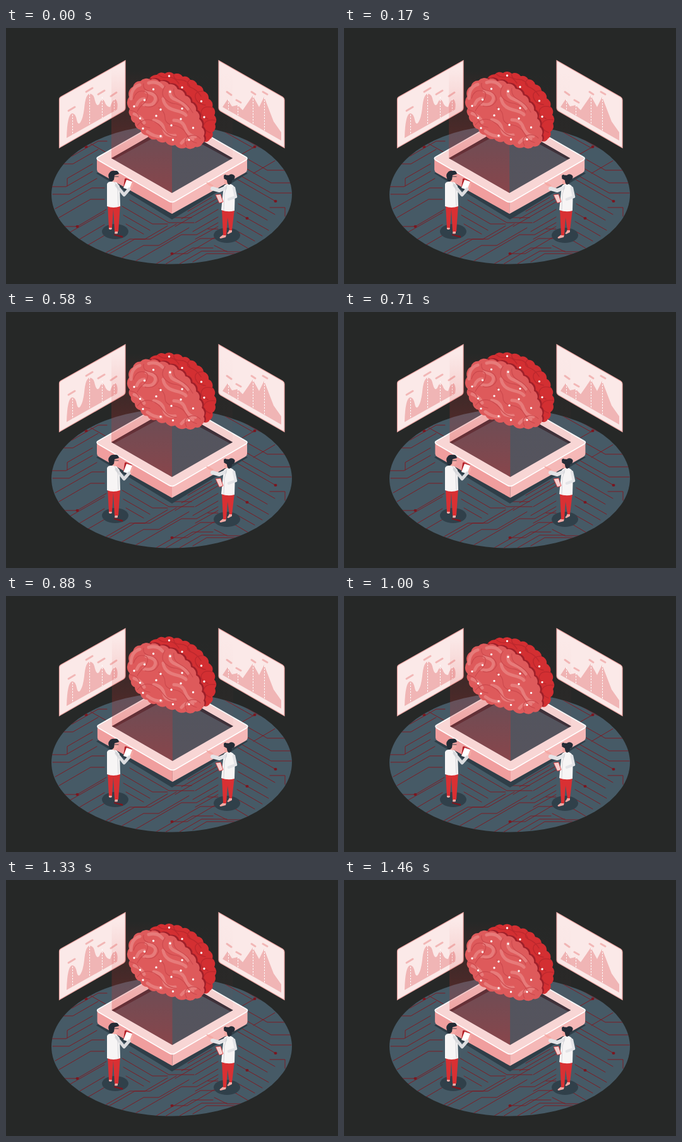
An HTML page that plays this animation: 526x405 px, repeating every 1500 ms.

```html
<!DOCTYPE html>
<html lang="en">
<head>
<meta charset="utf-8">
<title>Brain lab</title>
<style>
  html, body { margin: 0; width: 100%; height: 100%; overflow: hidden; background: #262827; }
  svg { display: block; width: 526px; height: 405px; }
  .line { fill: none; stroke-linecap: round; stroke-linejoin: round; }
  .dash { fill: none; stroke: #fff; stroke-width: 1; stroke-dasharray: 2.5 2; }
</style>
</head>
<body>
<svg viewBox="0 0 526 405">
  <defs>
    <linearGradient id="redBeam" x2="0" y2="1">
      <stop offset=".05" stop-color="#d63030" stop-opacity="0"/>
      <stop offset="1" stop-color="#d63030" stop-opacity=".42"/>
    </linearGradient>
    <linearGradient id="dimBeam" x2="0" y2="1">
      <stop offset=".05" stop-color="#b04040" stop-opacity="0"/>
      <stop offset="1" stop-color="#b04040" stop-opacity=".06"/>
    </linearGradient>
    <clipPath id="floorClip"><ellipse cx="262.5" cy="263.5" rx="190.5" ry="110"/></clipPath>
    <clipPath id="rearClip"><path class="rear"/></clipPath>
    <clipPath id="frontClip"><path class="front"/></clipPath>
  </defs>

  <!-- circuit floor -->
  <g clip-path="url(#floorClip)">
    <path fill="#465a66" d="M70 150h390v230H70z"/>
    <g class="line" stroke="#7d1c24" stroke-width="1">
      <path d="M73 251h22l42-24M74 263h26l44-25M78 286l58-33h20M84 300l50-29h22M97 250v-12l40-23M88 215h18l40-23M104 203l42-24h14M127 188h-24M125 178l34 19M113 314H92M113 314l46-27M98 325l58-33M110 338l46-27"/>
      <path d="M122 348l36-21M132 358h22l42-24h24l36-21M152 364l52-30h24l42-24M176 368l42-24h24l48-28M200 372l78-45h24l34-19M184 282l48 28h24M186 296l42 24M190 310l28 16M196 272l62 36h40M212 270l52 30h30M226 380l82-47h26M263 357h24l46-27"/>
      <path d="M394 188l-30 17M372 172l30 17h34M384 208l30 17h32M380 222l40 23h30M372 234l48 27h32M427 274l-68-39M418 284h24v14M368 262l58 33M368 278l46 26M382 301l-16-9M382 301l34 19M366 306l40 23M346 164l46 26M392 230l34-20"/>
      <path d="M288 290l38-22M278 302l56-32M268 314l68-39M300 308l36-21M296 322l40-23M300 334l36-20M252 374l44-26h32M270 376l40-23h40M296 370l22-13h44M364 320l30 17M362 336l22 13M320 318h16M330 344l20 10h40"/>
    </g>
    <path class="line" stroke="#7b1720" stroke-width="4" d="M126.500 188h1M112.500 314h1M262.500 357h1M393.500 188h1M426.500 274h1M381.500 301h1"/>
  </g>

  <!-- left screen -->
  <path fill="#fbe9e8" stroke="#f0a9a7" stroke-width="1.200" d="M84.500 113q0-3 3-4.500L189 51.500v75q0 3-3 5L84.500 189.500z"/>
  <path fill="#f0b5b5" d="M96 174q1-38 9-39 5 0 7 10 2 10 6 4 4-6 6-22 2-23 9-23 6 0 8 11 3 11 7 5 4-11 8-4 3 9 9 9 4-13 9-12 4 5 2 16z"/>
  <path class="dash" d="M105.500 137v32M132.500 104v49M152.500 109v33M171.500 112v19"/>
  <path class="line" stroke="#f2b7b6" stroke-width="3" d="M99 131l10-6M127 101l10-6M146 105l10-6M166 108l9-6"/>

  <!-- right screen -->
  <path fill="#fbe9e8" stroke="#f0a9a7" stroke-width="1.200" d="M337 51.500l101 57.500q3 2 3 5v75.500l-101-58q-3-2-3-5z"/>
  <path fill="#f0b5b5" d="M343 125l8-12 7 11 9-2 8 8 16-23 10 18 8-16 15 39 12 17v13z"/>
  <path class="dash" d="M352.500 113v17M367.500 122v17M391.500 108v44M409.500 110v52"/>
  <path class="line" stroke="#f2b7b6" stroke-width="3" d="M350 101l7 5M365 114l7 4M389 101l6 4M407 101l7 4"/>

  <!-- platform and beam -->
  <path fill="#2f3e48" d="M143 230l120-66 120 66-120 73z"/>
  <g id="platform">
    <path fill="#f09e9e" d="M144 207v17q0 3 3 5l116 65v-22z"/>
    <path fill="#f5b8b7" d="M382 207v17q0 3-3 5l-116 65v-22z"/>
    <path fill="#f8d6d5" d="M146 204l112-64q5-3 10 0l112 64q4 2 0 5l-112 65q-5 3-10 0l-112-65q-4-3 0-5z"/>
    <path class="line" stroke="#fff" stroke-width="1.500" d="M258 140l-112 64q-4 2 0 5l112 65q5 3 10 0l112-65q4-3 0-5l-112-64"/>
    <path fill="#50555f" d="M167 206l96-55 96 55-96 55z"/>
    <path fill="#3a3039" d="M167 206l96-55 96 55-4 2-92-50-92 50z"/>
    <path fill="url(#redBeam)" d="M167 55h96v206l-96-55z"/>
    <path fill="url(#dimBeam)" d="M359 55h-96v206l96-55z"/>
  </g>

  <!-- brain -->
  <g id="brain">
    <path class="rear" fill="#d32f32"/>
    <g clip-path="url(#rearClip)">
      <path class="line" stroke="#bd282d" stroke-width="1.500" d="M240 72q6 8 16 6t18 10M266 72q-2 10 10 10t16 12M291 82q-8 8 2 12t16 14M312 100q-14 0-12 10t16 12M328 126q-14-4-18 4t10 14M332 146q-14-2-18 6t10 14"/>
      <path class="front" fill="#9f202a" transform="translate(2.500 -1.500)"/>
    </g>
    <path class="front" fill="#de5a5b"/>
    <g class="line" clip-path="url(#frontClip)">
      <path stroke="#e77b7a" stroke-width="5" d="M198 112q0-18 14-22M226 87q14-4 22 6M222 101q18 4 14 14t-18 6M260 100q-2 10 10 14t18 14M249 112q2 14 18 18t18 8M203 136q12 4 16 14M234 146q14 2 16 14t18 10M266 146q14 0 18 12t16 14M224 164q10 8 22 8M278 182q8-10 18-6M207 122q4-10 12-10"/>
      <path stroke="#cc494d" stroke-width="1.200" d="M202 112q4-14 16-12t2 18q-8 6-12 14M218 88q-2 10 10 12t14 14q-6 14-22 10M252 92q-8 12 0 20t18 8q14 4 18 14M196 130q14 2 16 14t16 14M208 154q10-12 22-8t20 16q8 10 20 10M242 126q10 6 10 16t14 12q14 2 20 14t16 14M266 96q-2 12 10 18t20 20M286 187q-6-12 4-16t18 4"/>
    </g>
    <path class="line" stroke="#fff" stroke-width="3.400" d="M258.500 76h0M279 94h0M233.500 97h0M260 101h0M309.500 116h0M219.500 114h0M203 124h0M245 129h0M279 127.500h0M314 141h0M238 139h0M212.500 143h0M277 144h0M262 154h0M217 159h0M296.500 158h0M245 171h0M264.500 177h0M290 177h0"/>
  </g>

  <!-- man with tablet -->
  <ellipse cx="173" cy="322" rx="21" ry="12" fill="#30404a"/>
  <path fill="#7b1720" d="M171 326l14 3v3l-14-4z"/>
  <path fill="#f5aaa5" d="M163 314h4l1 4q-3 2-5 0zM173 320h4v5q-3 1-5 0zM168 230h9l1 9-4 4-1 5h-6zM194 251l5-6 3 1-2 7-5 4z"/>
  <path fill="#d93033" d="M161 280h20l-3 42h-6l-2-36-2 30h-5z"/>
  <path fill="#b32129" d="M188 239q1-2 3-1l9 4-7 13-7-3z"/>
  <path fill="#fff" d="M191 240l9 3-5 13-9-3z"/>
  <path fill="#f7f5f5" d="M160 247q1-4 7-4l8 1 5 6 1 32q-11 4-21 0z"/>
  <path class="line" stroke="#dcdde0" stroke-width="5" d="M175 249l12 15 8-9"/>
  <path class="line" stroke="#c9cbd0" stroke-width=".8" d="M172 244l5 9 1 28"/>
  <path fill="#252c36" d="M163 237q-2-5 1-8 3-4 8-3 6-1 7 5l-7 2-1 7-3 3q-5-1-5-6z"/>
  <path class="line" stroke="#252c36" stroke-width=".9" d="M172 235h6"/>

  <!-- woman with clipboard -->
  <ellipse cx="350" cy="328" rx="21" ry="12" fill="#30404a"/>
  <path fill="#f5aaa5" d="M344 327h5l-1 4-8 2q-3-1 0-3zM354 319h4v4l-6 3q-3-1 0-3zM346 237h9l1 12h-6l-4-3zM327 251l-6-2-4-5 5 1 7 4z"/>
  <path fill="#d93033" d="M342 287h20l-4 33h-4l-3-20-2 28h-5z"/>
  <path fill="#f7f5f5" d="M345 250q4-4 11-3 5 1 7 8l-1 34q-10 3-21-1l2-20z"/>
  <path class="line" stroke="#e4e4e7" stroke-width="6" d="M347 253l-9 4-11-3"/>
  <path class="line" stroke="#e4e4e7" stroke-width="4.500" d="M361 253l3 14-11 4"/>
  <path fill="#f7cfce" stroke="#d93033" stroke-width=".8" d="M332 264l8-1 4 12-6 2z"/>
  <path class="line" stroke="#c9cbd0" stroke-width=".8" d="M350 249l-4 14-1 25"/>
  <path fill="#252c36" d="M345 238q1-6 8-5 3-3 7-1 4 2 2 6-1 3-4 3 0 6-5 7-3-2-3-7z"/>
  <circle cx="347.500" cy="234.500" r="2.500" fill="#252c36"/>
</svg>
<script>
  const PERIOD = 1500, TURN = 580;
  const rear = [[226,84],[239,74],[252,72],[266,73],[280,77],[292,82],[303,90],[313,100],[321,112],
    [327,125],[330,138],[331,152],[327,165],[323,176],[314,180]];
  const front = [[196,128],[195,109],[201,93],[213,84],[229,82],[243,85],[258,89],[272,97],[284,107],
    [293,118],[301,131],[306,144],[310,157],[313,171],[311,183],[300,188],[285,189],[268,185],
    [253,180],[238,176],[224,170],[213,161],[204,150],[198,140],[196,128]];

  // Joins points with outward arcs to make a scalloped outline.
  const scallop = points => 'M' + points.map((p, i) => {
    const next = points[i + 1];
    if (!next) return p;
    const r = 0.75 * Math.hypot(next[0] - p[0], next[1] - p[1]);
    return `${p}A${r} ${r} 0 0 1 `;
  }).join('') + 'z';

  const shape = (name, points) => document.querySelectorAll('.' + name)
    .forEach(el => el.setAttribute('d', scallop(points)));
  shape('rear', rear);
  shape('front', front);

  const brain = document.getElementById('brain');
  const platform = document.getElementById('platform');

  function draw() {
    const t = performance.now() % PERIOD;
    const lift = -3.1 * (1 - Math.cos(2 * Math.PI * t / PERIOD));
    const sway = t < TURN
      ? -Math.sin(Math.PI * t / TURN)
      : Math.sin(Math.PI * (t - TURN) / (PERIOD - TURN));
    brain.setAttribute('transform', `translate(0 ${lift})`);
    platform.setAttribute('transform', `translate(${sway} 0)`);
    requestAnimationFrame(draw);
  }
  draw();
</script>
</body>
</html>
```
